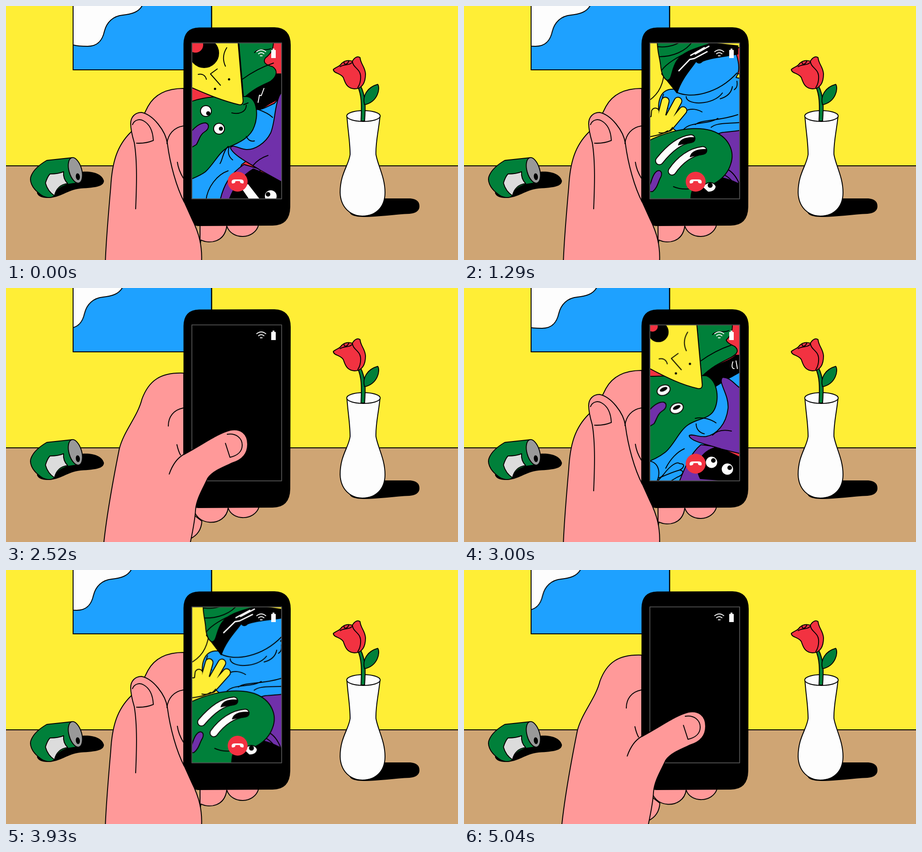
Recreate the animation shown at these times as an HTML page without scripts. Size 997 by 561 pixels, loop 5.07 s.

```html
<!DOCTYPE html>
<html lang="en">
<head>
<meta charset="utf-8">
<title>Video call</title>
<style>
html,body{margin:0;width:100%;height:100%;overflow:hidden;background:#ffee36}
svg{display:block;width:100vw;height:100vh;fill:none;stroke:#000;stroke-width:2;stroke-linejoin:round;stroke-linecap:round}
.y{fill:#ffee36}.b{fill:#1ea1ff}.g{fill:#00803a}.p{fill:#7030aa}.r{fill:#f23241}
.k{fill:#000}.w{fill:#fdfdfd}.s{fill:#ff9999}
.n{stroke:none}
.wl{stroke:#fdfdfd}
/* capsule limbs: dark outline, coloured core */
.o{stroke-width:23}.i{stroke-width:19;stroke:#fdfdfd}
.o2{stroke-width:19}.i2{stroke-width:15;stroke:#fdfdfd}
.i.bl{stroke:#1ea1ff}.i2.yl{stroke:#ffee36}

.m{animation:2535ms linear 15ms infinite backwards}
.pose{transform-origin:510px 254px}
.cloud{animation-name:cloud}
@keyframes cloud{to{transform:translateX(-44.3px)}}

.open{animation-name:open}
.shut{animation-name:shut}
.rest{animation-name:rest}
@keyframes open{0%,71%{opacity:1}71.01%,to{opacity:0}}
@keyframes shut{0%,71%{opacity:0}71.01%,to{opacity:1}}
@keyframes rest{0%,75%{opacity:0}75.01%,to{opacity:1}}
.off{animation-name:off}
@keyframes off{0%,79.2%{opacity:0}79.21%,to{opacity:1}}

.p2{animation-name:p2}
.p3{animation-name:p3}
.p4{animation-name:p4}
@keyframes p2{
0%,28.39%{opacity:0;transform:translate(8px,-10px) rotate(-4deg)}
28.4%{opacity:1;transform:translate(8px,-10px) rotate(-4deg)}
34.3%{transform:none}
42.6%,to{transform:translate(-8px,10px) rotate(5deg)}}
@keyframes p3{
0%,42.59%{opacity:0;transform:translate(-8px,12px) rotate(-5deg)}
42.6%{opacity:1;transform:translate(-8px,12px) rotate(-5deg)}
50.3%{transform:none}
62.1%,to{transform:translate(8px,-10px) rotate(5deg)}}
@keyframes p4{
0%,62.09%{opacity:0;transform:translate(-10px,8px) rotate(-5deg)}
62.1%{opacity:1;transform:translate(-10px,8px) rotate(-5deg)}
72.8%{transform:none}
80%,to{transform:translate(4px,-4px) rotate(2deg)}}

/* first pose bends into the second */
.hat{animation-name:hat}
@keyframes hat{
0%{d:path("M513 75H590C590 95 586 104 572 115C566 124 572 130 588 134C600 142 598 156 584 166C570 174 548 180 524 204Z")}
22.5%,to{d:path("M513 75H592C594 95 590 104 580 115C584 120 590 122 600 128C608 136 606 142 590 150C570 160 548 170 524 194Z")}}
.shade{animation-name:shade}
@keyframes shade{
0%{d:path("M520 200C545 180 590 165 597 150H625V190C605 205 590 210 578 218L552 235Z")}
22.5%,to{d:path("M520 190C545 170 590 160 600 148H625V195C605 195 590 190 578 205L552 215Z")}}
.arm{animation-name:arm}
@keyframes arm{
0%{d:path("M540 225C560 235 575 222 592 215L615 190V240C600 260 585 300 560 320L520 350L480 440H400V375Z")}
22.5%,to{d:path("M540 225C556 215 570 200 592 190L615 180V250C600 280 585 320 560 340L520 350L480 440H400V375Z")}}
.ring{animation-name:ring}
@keyframes ring{
0%{d:path("M470 440C478 395 495 370 525 350L560 360L570 440Z")}
22.5%,to{d:path("M470 440C490 395 500 365 522 345L570 350L640 440Z")}}
.dark{animation-name:dark}
@keyframes dark{
0%{d:path("M488 440C500 400 520 375 545 360C570 368 590 380 625 395V440Z")}
22.5%,to{d:path("M530 416C505 385 530 355 555 351C580 352 595 365 625 378V426Z")}}
.hood{animation-name:hood}
@keyframes hood{
0%{d:path("M620 180C612 186 606 192 603 198C592 222 594 255 584 280C572 304 548 318 530 317C515 316 500 304 495 313C500 330 545 352 560 362L625 398Z")}
22.5%,to{d:path("M620 238C596 230 590 200 562 197C550 204 582 228 582 262C580 300 560 325 535 331C520 334 500 325 497 330C500 342 540 345 570 354L625 362Z")}}
.face{animation-name:face}
@keyframes face{
0%{d:path("M400 215C440 195 500 200 532 200C556 205 556 245 548 265C540 290 515 302 490 312C470 322 458 350 440 366C430 374 415 380 400 386Z")}
22.5%,to{d:path("M400 190C440 195 500 190 535 192C562 205 566 250 552 272C540 290 515 284 495 300C475 315 465 345 445 362C430 374 415 380 400 386Z")}}
.cone{animation-name:cone}
@keyframes cone{
0%{d:path("M400 70H511L523 210Q522 220 514 218C480 210 450 198 400 176Z")}
22.5%,to{d:path("M400 70H513L526 212Q528 225 516 223C480 215 450 200 400 172Z")}}
.slide{animation-name:slide}
@keyframes slide{22.5%,to{transform:translate(8px,7px)}}
.lift{animation-name:lift}
@keyframes lift{22.5%,to{transform:translate(-1px,-8px)}}
.small{transform-origin:411px 82px;animation-name:small}
@keyframes small{22.5%,to{transform:scale(.6)}}
.early{animation-name:early}
.late{animation-name:late}
@keyframes early{0%,11%{opacity:1}11.01%,to{opacity:0}}
@keyframes late{0%,11%{opacity:0}11.01%,to{opacity:1}}

/* thumb reaching over the glass */
.palm{animation-name:palm}
@keyframes palm{
0%,73.4%{d:path("M392 185C345 185 325 200 315 222C300 255 260 300 245 350C235 420 225 490 216 570H406C406 540 407 510 408 490C415 460 412 425 425 400C440 375 465 365 480 352C492 342 497 322 490 305C478 288 455 288 440 298C425 310 412 328 392 343Z")}
77%,to{d:path("M392 188C340 186 315 205 300 245C290 285 260 315 250 355C235 430 222 500 215 570H405C410 545 417 515 418 490C420 465 436 440 445 420C456 404 480 395 500 386C525 378 533 362 533 345C533 322 518 310 495 314C465 322 440 342 392 368Z")}}
.nail{animation-name:nail}
@keyframes nail{
0%,73.4%{d:path("M443 307C465 298 482 312 481 328C480 342 470 350 459 355L443 327")}
77%,to{d:path("M488 323C508 320 521 332 521 347C521 360 512 370 494 374L484 343")}}
.root{animation-name:root}
@keyframes root{
0%,73.4%{d:path("M321 420C335 385 365 362 393 343")}
77%,to{d:path("M360 411C368 388 380 374 393 367")}}
</style>
</head>
<body>
<svg viewBox="0 0 997 561">
<defs>
<clipPath id="pic"><rect x="149" y="-5" width="304" height="145"/></clipPath>
<clipPath id="glass"><rect x="411" y="82" width="197" height="344"/></clipPath>
</defs>
<rect class="y n" width="997" height="354"/>
<path fill="#cfa574" d="M-5 353H1002V570H-5Z"/>

<rect class="b" x="148" y="-5" width="305.500" height="146"/>
<g clip-path="url(#pic)"><path class="w m cloud" d="M300 0C292 14 276 18 258 20C236 22 222 36 217 56C213 74 204 89 180 89C168 89 158 89 148 86L130 80V-5H302Z"/></g>
<path d="M148 0V141H453.500V0"/>

<!-- can -->
<path class="k n" d="M68 412L168 366C190 364 212 370 216 386C216 398 200 401 165 403C135 406 120 424 92 424C78 424 70 420 68 412Z"/>
<path class="g" d="M146 335L90 341C78 348 62 360 56 374C50 386 58 402 72 413C84 424 98 426 107 419C112 406 118 400 136 394L163 390Z"/>
<path fill="#dcdcdc" d="M87 391C90 381 94 374 97 371C108 371 120 369 127 366C126 376 129 385 136 392C120 394 110 404 107 419C96 412 90 402 87 391Z"/>
<ellipse fill="#999" cx="153" cy="363" rx="14" ry="29" transform="rotate(-16 153 363)"/>
<ellipse class="k" cx="158.500" cy="377" rx="3.500" ry="6.500" transform="rotate(-8 158 377)"/>

<!-- vase and rose -->
<path class="k n" d="M790 466C770 466 760 462 758 456L834 425H892Q912 427 912 442Q912 457 890 459C860 460 820 466 790 466Z"/>
<path class="w" d="M752 243C754 275 759 300 759 328C756 352 737 370 737 412C738 445 760 464 786 464C816 464 836 444 836 412C836 378 820 352 816 328C815 300 822 275 825 243Z"/>
<ellipse class="w" cx="788.500" cy="243" rx="37" ry="12"/>
<path class="g" d="M776 178C784 196 785 215 783 254H791C793 225 794 200 782 176Z"/>
<path class="g" d="M791 218C785 198 798 179 820 173C826 182 820 212 791 218Z"/>
<path class="r" d="M722 140C730 134 737 133 740 127C748 119 758 120 764 122C769 113 776 110 781 114C782 128 792 134 793 150C793 170 785 183 769 183C752 182 748 170 744 158C738 148 722 149 722 140Z"/>
<path d="M764 122C765 136 780 138 782 153C783 164 780 174 776 180M737 134C745 128 758 132 764 124M746 123C744 130 752 131 756 122"/>

<!-- fingers behind the phone -->
<g class="s">
<path class="m open" d="M428 470V528L430 517C450 526 482 522 487 486C498 518 548 516 557 484V470Z"/>
<g class="m shut">
<path d="M400 490L432 515C431 533 423 546 406 554Z"/>
<path d="M413 480C414 528 484 530 490 486C500 515 548 514 558 484V470Z"/>
</g>
</g>

<path class="k n" d="M391.500 84Q392 48 426 47.500L592 47Q628 48 628 86L627 444Q626 485 588 485L424 486Q391.500 484 391.500 446Z"/>

<g clip-path="url(#glass)">
<g>
<rect class="r n" x="400" y="70" width="220" height="370"/>
<path class="k m shade"/>
<path class="b m arm"/>
<path class="g m hat"/>
<path d="M521 162C540 148 560 136 590 126M548 103C556 92 574 100 584 94"/>
<path class="p m ring"/>
<path class="k m dark"/>
<path class="p m hood"/>
<path class="g m face"/>
<g class="m lift">
<path class="p" d="M400 290C414 266 430 258 440 258C450 261 448 272 438 278C428 284 426 296 420 306L400 318Z"/>
<g class="m early">
<circle class="w" cx="441" cy="232" r="12"/><circle class="k n" cx="446" cy="237" r="4.500"/>
<circle class="w" cx="470" cy="271" r="12"/><circle class="k n" cx="474" cy="271" r="4.500"/>
</g>
<g class="m late">
<ellipse class="w" cx="441" cy="232" rx="15" ry="11" transform="rotate(-24 441 232)"/>
<ellipse class="k n" cx="441" cy="230" rx="9" ry="4" transform="rotate(-24 441 230)"/>
<ellipse class="w" cx="470" cy="272" rx="15" ry="11" transform="rotate(-24 470 272)"/>
<ellipse class="k n" cx="470" cy="270" rx="9" ry="4" transform="rotate(-24 470 270)"/>
</g>
</g>
<path class="m early" d="M498 236C514 240 530 234 530 219M524 218L534 214"/>
<path class="y m cone"/>
<g class="m small"><circle class="k" cx="437" cy="104" r="32"/><circle class="r n" cx="418" cy="86" r="17"/></g>
<g class="m slide">
<path d="M487 92C478 106 478 120 484 133M466 139L451 150L473 175M424 151C434 149 440 154 442 162"/>
<circle class="k n" cx="492" cy="162" r="2.500"/><circle class="k n" cx="461" cy="183" r="2.500"/>
</g>
<g class="m early">
<path class="wl" d="M569 182L563 198L559 197L556 213"/>
<path d="M555 228C566 232 580 238 588 246M441 430C444 400 466 372 490 364M490 310C478 322 478 340 472 348M492 312C488 324 492 334 500 340M530 288C534 296 540 300 548 298M545 352C555 340 566 334 578 330"/>
<path class="w" d="M518 402L534 392L562 428H536Z"/>
<circle class="w" cx="584" cy="420" r="14"/><circle class="k n" cx="578" cy="416" r="5"/>
</g>
<g class="m late">
<path class="wl" d="M593 163C590 172 591 178 596 178M600 161L603 178"/>
<path d="M510 288C526 284 545 290 556 298M512 300C512 312 520 320 530 322M445 398C455 378 470 362 486 355M548 325C558 315 572 312 590 316"/>
<path class="b" d="M400 385C420 375 440 400 424 430L440 412C455 392 470 382 476 388C490 388 484 398 476 402C488 404 482 414 470 418L450 430H400Z"/>
<path d="M428 420C440 416 460 406 476 402"/>
<circle class="w" cx="546" cy="385" r="13.500"/><circle class="k n" cx="550" cy="381" r="5"/>
<circle class="w" cx="581" cy="400" r="13.500"/><circle class="k n" cx="586" cy="397" r="5"/>
</g>
</g>

<g class="m pose p2">
<rect class="y n" x="350" y="30" width="320" height="450"/>
<path class="g" d="M515 40C514 100 525 112 548 122L640 70V40Z"/>
<path class="k" d="M560 118L606 82H640V140L600 124L585 146Z"/>
<path class="b" d="M482 300C486 262 516 220 546 218C562 214 572 226 578 214C574 190 588 150 600 128L640 110V300L500 360Z"/>
<path d="M578 214C572 200 586 188 607 192M586 196C580 205 586 214 594 210M556 272C566 278 572 290 562 305"/>
<path d="M440 122C456 140 492 146 524 138M400 178C432 172 450 150 464 138M430 165L478 222Q490 238 500 236Q509 234 510 222L519 158M484 229C490 238 490 246 489 254M444 158L454 148M453 160L466 150M478 142C482 150 480 156 478 160M468 162L463 172L474 180M489 178L480 181L487 187M463 184L471 184L468 194"/>
<path class="wl" stroke-width="3" d="M584 106L578 130M592 98L588 124"/>
<g class="y">
<rect x="527" y="103" width="27" height="60" rx="13.500" transform="rotate(28 540 133)"/>
<rect x="540" y="119" width="27" height="66" rx="13.500" transform="rotate(28 553 152)"/>
<rect x="554" y="134" width="27" height="68" rx="13.500" transform="rotate(22 567 168)"/>
</g>
<path class="p" d="M640 150C600 190 592 240 572 292C560 312 530 312 516 326C504 336 498 346 494 356L520 400H640Z"/>
<path d="M527 322C554 312 585 315 640 325"/>
<path class="k" d="M490 362C520 338 575 345 650 390V480H490Z"/>
<path class="w" d="M512 360C522 358 540 378 546 388C540 396 520 390 512 360Z"/>
<path class="w" d="M551 398L599 391C600 404 590 411 576 411C561 411 552 406 551 398Z"/><circle class="k n" cx="566" cy="401" r="6"/>
<path class="g" d="M360 240C430 236 482 280 490 310C498 340 495 380 495 480H360Z"/>
<path class="o2" d="M452 280C464 292 464 312 470 329"/><path class="i2" d="M452 280C464 292 464 312 470 329"/>
<path class="o2" d="M404 298C426 320 430 342 439 361"/><path class="i2" d="M404 298C426 320 430 342 439 361"/>
<ellipse class="k n" cx="415" cy="307" rx="13" ry="8.500" transform="rotate(35 415 307)"/>
<path class="p" d="M450 440C454 408 464 405 458 385C456 370 472 370 473 383C474 405 482 405 482 440Z"/>
<path class="y n" d="M360 240H420L424 275L405 250L360 245Z"/>
<g class="y">
<rect x="458" y="248" width="25" height="49" rx="12.500" transform="rotate(14 470 272)"/>
<rect x="438" y="241" width="25" height="50" rx="12.500" transform="rotate(12 450 266)"/>
<rect x="417" y="235" width="25" height="48" rx="12.500" transform="rotate(10 430 259)"/>
</g>
</g>

<g class="m pose p3">
<rect class="y n" x="350" y="30" width="320" height="450"/>
<path class="r" d="M600 95L650 70V150H600Z"/>
<path d="M441 150C438 180 425 200 400 214"/>
<path class="b" d="M434 250C424 220 428 180 466 184L500 120L600 104C608 130 608 145 600 158L660 170V300L480 285Z"/>
<path d="M468 190C500 206 560 194 602 148M490 200C490 220 550 220 570 192M565 205C582 200 590 190 592 178M596 185C600 182 604 178 602 166M440 195C434 210 440 220 450 226M488 232C500 225 515 228 525 234M485 272C500 255 540 262 560 248M510 262C525 250 560 255 604 240M545 268C560 256 580 262 640 254"/>
<path class="k" d="M436 150L470 192C480 160 500 140 512 122C516 128 522 127 526 122C550 112 580 112 604 106V88L530 80L450 120Z"/>
<path class="g" d="M426 40C424 105 432 110 434 135C436 150 440 160 448 164C460 164 456 140 470 120C485 100 510 94 540 84V40Z"/>
<path d="M428 90C450 92 475 86 486 70M431 112C460 112 490 100 504 78M436 142C446 128 470 112 500 100"/>
<path class="wl" stroke-width="3" d="M474 143L498 118L508 116L536 101M500 109L530 92M510 106L540 89"/>
<path class="o2" d="M420 260L422 234M432 258L444 210M444 262L472 210M452 268L483 231"/>
<path class="y" d="M380 240L410 245L424 240L444 240L466 248C462 272 445 285 400 290H380Z"/>
<path class="i2 yl" d="M420 260L422 234M432 258L444 210M444 262L472 210M452 268L483 231"/>
<path d="M430 280C445 282 455 276 460 268"/>
<path class="p" d="M555 285C575 272 590 286 660 260V420H560Z"/>
<path d="M580 360C592 366 600 376 607 392M572 372C585 378 594 388 598 400"/>
<path class="k" d="M495 480L500 400C540 365 585 372 650 420V480Z"/>
<path class="g" d="M360 330C420 278 500 262 545 275C585 288 598 322 588 350C578 382 545 402 505 406C500 412 500 420 500 480H360Z"/>
<path d="M462 399C480 407 505 406 524 396"/>
<path class="o2" d="M431 342C450 318 474 296 501 293"/><path class="i2" d="M431 342C450 318 474 296 501 293"/>
<path class="k n" d="M472 308C474 294 490 288 510 290C512 300 500 304 490 304Z"/>
<path class="o2" d="M459 365C476 340 500 322 527 319"/><path class="i2" d="M459 365C476 340 500 322 527 319"/>
<path class="k n" d="M498 334C500 320 516 315 536 316C538 326 526 330 516 330Z"/>
<path class="p" d="M400 408C414 400 412 378 422 368C430 358 440 366 434 378C428 388 428 400 416 410H400Z"/>
<path class="w" d="M526 400C534 388 550 386 556 398C556 408 546 411 538 411Z"/><circle class="k n" cx="543" cy="396" r="5.500"/>
</g>

<g class="m pose p4">
<rect class="y n" x="350" y="30" width="320" height="450"/>
<path class="b" d="M360 40H500L512 95L470 110L500 180L515 186L500 290L490 365L420 330L360 290Z"/>
<path d="M442 88C456 100 458 120 448 130M428 138C424 150 434 156 440 150M438 132C454 134 450 170 470 190C480 196 490 196 497 190M428 134L452 130M448 184C444 196 460 196 468 204M446 212C456 214 460 204 458 198"/>
<path d="M516 186C530 172 560 172 582 178M578 272C568 250 568 218 584 220C600 220 606 250 604 290M610 222C600 228 604 250 607 268"/>
<path class="k" d="M464 112C468 98 495 94 504 104C520 116 530 140 531 158C530 180 508 186 496 176C488 168 494 152 490 146C474 146 460 130 464 112Z"/>
<path class="g" d="M498 98C510 88 530 98 542 94C560 94 570 82 590 70L562 150C556 170 540 172 530 160C528 140 520 122 504 114Z"/>
<path d="M504 112C520 104 534 118 538 140C540 150 536 158 530 162M524 96C540 104 552 122 548 152M546 94C552 105 560 120 558 144"/>
<path class="wl" d="M489 129L516 131M497 138L504 137L508 143L523 147M500 141L509 147"/>
<path d="M592 122C596 135 594 140 589 144L596 144M580 148L574 162M598 152L602 164"/>
<g class="k n"><circle cx="583" cy="122" r="2.500"/><circle cx="604" cy="122" r="2.500"/><ellipse cx="588" cy="157" rx="4" ry="5"/></g>
<path class="o" d="M478 260L457 231M486 245L506 191M504 250L537 205M506 264L555 241"/>
<path class="b" d="M462 304C458 280 464 250 478 238L500 236C518 246 522 262 508 280C500 290 497 300 496 312"/>
<path class="i bl" d="M478 260L457 231M486 245L506 191M504 250L537 205M506 264L555 241"/>
<path d="M498 192L505 196M528 205L535 212M546 238L552 246"/>
<path class="k" d="M360 340L460 340L530 480H360Z"/>
<path class="p" d="M360 250C400 260 420 275 418 292C430 280 440 296 440 296C452 284 466 292 464 310L492 350L560 480H520C500 425 475 390 460 355L360 350Z"/>
<path class="r n" d="M480 356H495V378Z"/>
<circle class="w" cx="443" cy="388" r="16"/><circle class="k n" cx="443" cy="389" r="5.500"/>
<path class="g" d="M493 330C500 290 530 264 560 270C590 275 604 290 660 330V460H545C510 420 490 375 493 330Z"/>
<circle class="w" cx="585" cy="323" r="16.500"/><circle class="k n" cx="586" cy="324" r="5"/>
<circle class="w" cx="537" cy="364" r="17"/><circle class="k n" cx="531" cy="374" r="5.500"/>
<path d="M590 344C598 344 604 338 606 330M530 384C540 388 550 382 553 376"/>
<path class="p" d="M578 366C584 356 598 364 650 390V425C600 416 602 404 592 394C584 384 576 376 578 366Z"/>
</g>

<circle class="r n" cx="511" cy="388" r="22"/>
<path class="w n" d="M498 391C496 382 504 383 511 383C518 383 526 382 524 391Q523 393 518 391Q516 390 516 387Q511 386 506 387Q506 390 504 391Q499 393 498 391Z"/>
<rect class="k n m off" x="405" y="75" width="210" height="360"/>
<path class="wl" d="M553 101Q563 93 573 101M557 105.500Q563 100.500 569 105.500M561 110H565"/>
<path class="w n" d="M585 98Q585 97 586 97H588V94H592V97H594Q595 97 595 98V115H585Z"/>
</g>
<rect x="410" y="81.500" width="198" height="344.500" stroke="#4b4b4b"/>

<g class="m open">
<path class="s" d="M392 182C348 182 325 200 313 222L304 240L276 278C245 308 234 345 231 400C224 480 220 530 219 570H431C434 530 425 500 410 470L392 430Z"/>
<path class="s n" d="M288 340L275 262C272 246 282 234 300 235C330 246 352 275 356 304L392 435L300 440Z"/>
<path d="M286 448C288 400 290 345 283 302C277 282 275 270 275 260C275 246 284 235 299 235C324 240 352 275 356 304C362 350 376 400 393 433"/>
<path d="M279 262C284 250 296 249 304 254C318 262 324 278 325 297Q308 304 288 303M391 265C370 268 357 284 355 304M378 345C380 360 385 370 391 380"/>
</g>
<g class="m shut">
<path class="s m palm"/>
<path class="m root"/>
<path class="m nail"/>
<path d="M391 265C370 269 358 284 358 305"/>
<path class="m rest" d="M377 346Q380 360 385 369"/>
</g>
</svg>
</body>
</html>
```
